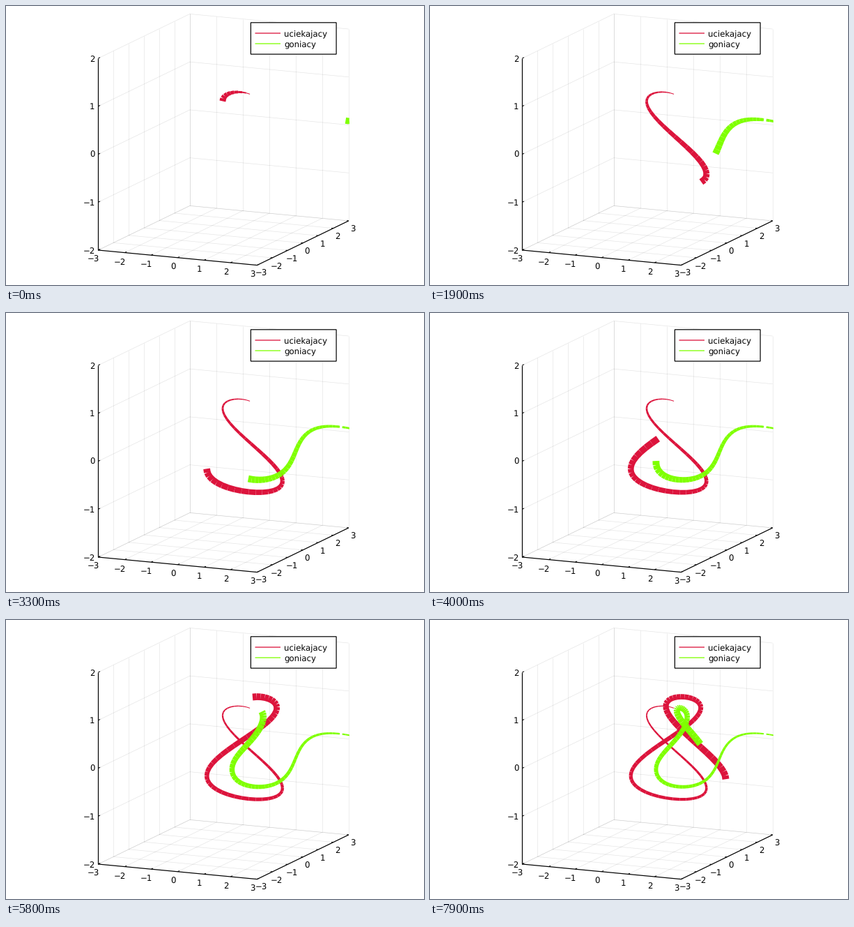
These frames come from a looping animation (600x400 px, 8 s). A matplotlib script:

```python
import numpy as np
import matplotlib.pyplot as plt
from matplotlib.animation import FuncAnimation
from matplotlib.collections import LineCollection
from matplotlib.patches import Rectangle

W, H, DPI = 600, 400, 100
PX = 72 / DPI
FRAMES, INTERVAL = 80, 100
FIRST = 10              # points already drawn in the opening frame
DT, SPEED = 0.1, 1.1
THIN, THICK = 1, 10
RED, GREEN = "#dc143c", "#7fff00"

plt.rcParams["font.family"] = "DejaVu Sans"
plt.rcParams["text.hinting"] = "none"


def project(p):
    """Orthographic view of 3D points, in stage pixels."""
    x, y, z = np.moveaxis(np.asarray(p, float), -1, 0)
    return np.stack([132.4 + 38 * (x + 3) + 21.9 * (y + 3),
                     350 + 3.6 * (x + 3) - 10.6 * (y + 3) - 68.75 * (z + 2)], -1)


def runner(t):
    return np.stack([np.cos(t) ** 2 - np.sin(2 * t),
                     np.sin(t) + 0.2 * t,
                     np.cos(t)], -1)


def chaser_path(times, start=(4, 3, 0)):
    """Pursuit at constant speed, integrated with the midpoint rule."""
    def velocity(t, p):
        d = runner(t) - p
        return SPEED * d / np.linalg.norm(d)

    path = [np.array(start, float)]
    for t in times[:-1]:
        p = path[-1]
        mid = p + velocity(t, p) * DT / 2
        path.append(p + velocity(t + DT / 2, mid) * DT)
    return np.array(path)


def segments(path):
    """Point pairs; a pair that enters the box through x = 3 is cut there."""
    segs = np.stack([path[:-1], path[1:]], 1)
    for s in segs:
        a, b = s
        if a[0] > 3 > b[0]:
            s[0] = a + (b - a) * (a[0] - 3) / (a[0] - b[0])
    return project(segs)


fig = plt.figure(figsize=(W / DPI, H / DPI), dpi=DPI, facecolor="white")
ax = fig.add_axes([0, 0, 1, 1])
ax.set_xlim(0, W)
ax.set_ylim(H, 0)
ax.axis("off")


def lines(pairs, color="black", width=1.0, **kw):
    lc = LineCollection(project(pairs), colors=color, linewidths=width * PX, **kw)
    ax.add_collection(lc)


def label(point, dx, dy, value, ha="center"):
    x, y = project(point)
    ax.text(x + dx, y + dy, str(value).replace("-", "\u2212"),
            fontsize=11.7 * PX, ha=ha, va="center")


# Grid on the floor and the two back walls
wide, tall = range(-3, 4), range(-2, 3)
grid = []
for v in wide:
    grid += [[(v, -3, -2), (v, 3, -2)], [(v, 3, -2), (v, 3, 2)],
             [(-3, v, -2), (3, v, -2)], [(-3, v, -2), (-3, v, 2)]]
for v in tall:
    grid += [[(-3, -3, v), (-3, 3, v)], [(-3, 3, v), (3, 3, v)]]
lines(grid, color=(0, 0, 0, 0.1), width=0.7, zorder=1)

# Axes, ticks and numbers
lines([[(-3, -3, -2), (-3, -3, 2)],
       [(-3, -3, -2), (3, -3, -2)],
       [(3, -3, -2), (3, 3, -2)]], width=1.2, zorder=2)
ticks = []
for v in wide:
    ticks += [[(v, -3, -2), (v, -2.88, -2)], [(3, v, -2), (2.93, v, -2)]]
    label((v, -3, -2), -6.6, 13.6, v)
    label((3, v, -2), 6.2, 12.4, v)
for v in tall:
    ticks.append([(-3, -3, v), (-3, -2.88, v)])
    label((-3, -3, v), -4.8, 1.2, v, ha="right")
lines(ticks, width=1.0, zorder=2)

# Trails
times = DT * np.arange(FIRST + FRAMES)
frame_box = Rectangle((132, 12), 360.5, 360, transform=ax.transData)
trails = []
for path, color in ((runner(times), RED), (chaser_path(times), GREEN)):
    lc = LineCollection([], colors=color, capstyle="butt", zorder=3)
    lc.set_snap(False)
    ax.add_collection(lc)
    lc.set_clip_path(frame_box)
    trails.append((lc, segments(path)))

# Legend
ax.add_patch(Rectangle((351.4, 23.8), 122.7, 45.3, facecolor="white",
                       edgecolor="black", linewidth=1.2 * PX, snap=False,
                       zorder=5))
for y, name, color in ((39, "uciekajacy", RED), (54, "goniacy", GREEN)):
    ax.plot([357.5, 394], [y, y], color=color, lw=1.3 * PX, zorder=6,
            solid_capstyle="butt", snap=False)
    ax.text(399.5, y + 4.5, name, fontsize=11.7 * PX, va="baseline", zorder=6)


def update(i):
    n = FIRST + i - 1
    widths = PX * np.linspace(THIN, THICK, n + 1)[:n]
    for lc, segs in trails:
        lc.set_segments(segs[:n])
        lc.set_linewidths(widths)
    return [lc for lc, _ in trails]


anim = FuncAnimation(fig, update, frames=FRAMES, interval=INTERVAL,
                     repeat=True, repeat_delay=0, blit=False)
plt.show()
```
